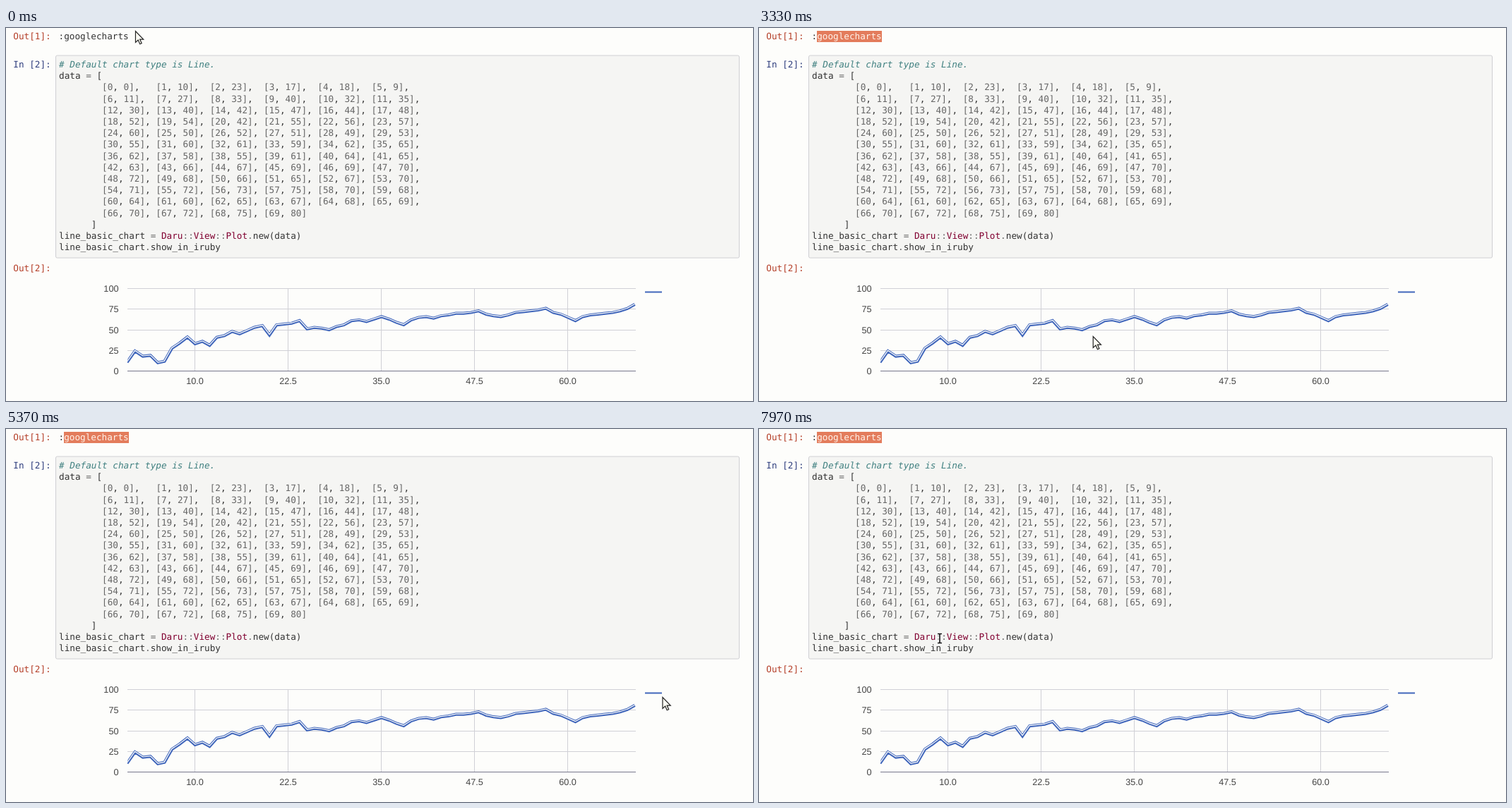
Write an HTML page that moves like this. It is 1058x529 px and loops after 8 s.

```html
<!DOCTYPE html>
<html lang="en">
<head>
<meta charset="utf-8">
<title>Line chart notebook</title>
<style>
  html, body { margin: 0; width: 100%; height: 100%; overflow: hidden; background: #fdfdfb; }
  svg { display: block; width: 1058px; height: 529px; }
  text { white-space: pre; text-rendering: geometricPrecision; fill: #333; }
  .code { font: 12.68px "DejaVu Sans Mono", monospace; }
  .label { font: 12.7px "Liberation Sans", Arial, sans-serif; fill: #444; }
  .tip { font: bold 12.7px "Liberation Sans", Arial, sans-serif; fill: #000; }
  .in { fill: #303f7f; }
  .out { fill: #b5402a; }
  .comment { fill: #408080; font-style: italic; }
  .op { fill: #666; }
  .const { fill: #800030; }
  .series { fill: none; stroke: #4066bb; stroke-width: 2; }
</style>
</head>
<body>
<svg id="stage" viewBox="0 0 1058 529"></svg>
<script>
const values = [
  0, 10, 23, 17, 18, 9, 11, 27, 33, 40, 32, 35, 30, 40, 42, 47, 44, 48,
  52, 54, 42, 55, 56, 57, 60, 50, 52, 51, 49, 53, 55, 60, 61, 59, 62, 65,
  62, 58, 55, 61, 64, 65, 63, 66, 67, 69, 69, 70, 72, 68, 66, 65, 67, 70,
  71, 72, 73, 75, 70, 68, 64, 60, 65, 67, 68, 69, 70, 72, 75, 80];
const px = v => 161.8 + v * 10.57;
const py = v => 486.5 - v * 1.17;

const span = (cls, s) => `<tspan class="${cls}">${s}</tspan>`;
const text = (cls, x, y, s, extra = '') => `<text class="${cls}" x="${x}" y="${y}" ${extra}>${s}</text>`;
const line = (x1, y1, x2, y2, color) =>
  `<path d="M${x1} ${y1}L${x2} ${y2}" stroke="${color}"/>`;

// Code cell
const pairs = values.map((v, i) => {
  const pair = `[${i}, ${v}]` + (i < 69 ? ',' : '');
  return pair.padEnd(10).replace(/[\[\]\d]+/g, m => span('op', m));
});
const code = [span('comment', '# Default chart type is Line.'), `data ${span('op', '=')} [`];
for (let i = 0; i < 70; i += 6) code.push(' '.repeat(8) + pairs.slice(i, i + 6).join(''));
const sep = span('op', '::'), dot = span('op', '.');
const path = ['Daru', 'View', 'Plot'].map(s => span('const', s)).join(sep);
code.push('      ]', `line_basic_chart ${span('op', '=')} ${path}${dot}new(data)`,
  `line_basic_chart${dot}show_in_iruby`);

let cell = '<rect x="70.5" y="39" width="968" height="287" rx="2" fill="#f5f5f3" stroke="#cfcfd3"/>';
code.forEach((s, i) => cell += text('code', 75, 56 + i * 16.2, s));

// Axes and grid
let grid = '';
for (const v of [10, 22.5, 35, 47.5, 60]) {
  const x = Math.round(px(v)) - .5;
  grid += line(x, 369, x, 486, '#d0d0d6') +
    text('label', x, 505, v.toFixed(1), 'text-anchor="middle"');
}
for (const v of [0, 25, 50, 75, 100]) {
  const y = Math.floor(py(v)) + .5;
  grid += line(172, y, 892, y, v ? '#d0d0d6' : '#77778c') +
    text('label', 159.5, y + 4.3, v, 'text-anchor="end"');
}

const points = values.slice(1).map((v, i) => `${px(i + 1).toFixed(2)} ${py(v).toFixed(2)}`).join('L');
const curve = 'M' + points;

document.getElementById('stage').innerHTML = `
  <clipPath id="above"><path d="${curve}V350H${px(1)}Z"/></clipPath>
  <filter id="soft"><feGaussianBlur stdDeviation="1"/></filter>
  <rect width="1058" height="529" fill="#fdfdfb"/>
  ${text('code out', 10.3, 16, 'Out[1]:')}
  ${text('code', 74.5, 16, ':')}
  <rect id="mark" x="82" y="4" width="92" height="16" fill="#e37c5c"/>
  ${text('code', 82.13, 16, 'googlecharts', 'id="word"')}
  ${text('code in', 10.3, 56, 'In [2]:')}
  ${cell}
  ${text('code out', 10.3, 344.5, 'Out[2]:')}
  ${grid}
  <g id="ring" clip-path="url(#above)" fill="none">
    <path d="${curve}" stroke="#4066bb" stroke-width="6.4"/>
    <path d="${curve}" stroke="#fdfdfb" stroke-width="4.4"/>
  </g>
  <path id="glow" d="${curve}" transform="translate(1 1.5)" filter="url(#soft)"
    fill="none" stroke="#4066bb" stroke-opacity=".4" stroke-width="3"/>
  <path class="series" d="${curve}"/>
  <path class="series" d="M905 374.5H929"/>
  <g id="tip">
    <circle r="4" fill="#4063b4"/>
    <rect x="-2" y="-58" width="40" height="44" fill="#999" opacity=".4" filter="url(#soft)"/>
    <path d="M-3.5 -59.5H36.5V-15.5H33L4 -3L16 -15.5H-3.5Z" fill="#fff" stroke="#d2d2d2"/>
    ${text('tip', 4, -41.5, '', 'id="tipX"')}
    ${text('tip', 4, -25.3, '', 'id="tipY"')}
  </g>
  <path id="arrow" d="M0 0V16L3.7 12.6L6.2 18.3L8.7 17.2L6.2 11.6H11.2Z" fill="#fffef4" stroke="#222" stroke-width="1.2"/>
  <g id="beam" fill="none">
    <path d="M-3 -6.5H3M0 -6.5V6.5M-3 6.5H3" stroke="#fff" stroke-width="3.4"/>
    <path d="M-3 -6.5H3M0 -6.5V6.5M-3 6.5H3" stroke="#111" stroke-width="1.6"/>
  </g>`;

// Pointer route: time, x, y
const route = [
  [0, 183.5, 4.5], [600, 158, 9], [1000, 150, 11], [1600, 234, 441], [2100, 268.5, 434.5],
  [2500, 310, 436], [3330, 473, 437.5], [4300, 701, 404.5], [5000, 930, 379], [5370, 930, 380.5],
  [6100, 921, 371], [6870, 920.5, 370.5], [7540, 920.5, 370.5], [7970, 256, 297], [8000, 256, 297]];
// Hovered points: from, to, index
const hovers = [[1850, 2220, 8], [4130, 4420, 49]];

const el = id => document.getElementById(id);
const show = (id, on) => el(id).style.display = on ? '' : 'none';
const move = (id, x, y) => el(id).setAttribute('transform', `translate(${x} ${y})`);

function draw(t) {
  const i = route.findIndex(k => k[0] > t);
  const [t0, x0, y0] = route[i - 1], [t1, x1, y1] = route[i];
  const p = (t - t0) / (t1 - t0);
  const x = x0 + (x1 - x0) * p, y = y0 + (y1 - y0) * p;
  const overText = y < 22 && x < 176 || x > 70 && x < 1038 && y > 39 && y < 326;
  show('arrow', !overText);
  show('beam', overText);
  move('arrow', x, y);
  move('beam', x, y);

  const marked = t >= 720;
  show('mark', marked);
  el('word').style.fill = marked ? '#fff4ec' : '#333';

  const selected = t < 6300 || t >= 7250;
  show('ring', selected);
  show('glow', !selected);

  const hover = hovers.find(h => t >= h[0] && t < h[1]);
  show('tip', hover);
  if (hover) {
    const n = hover[2];
    move('tip', px(n), py(values[n]));
    el('tipX').textContent = n;
    el('tipY').textContent = values[n];
  }
}

const start = performance.now();
function tick() {
  draw((performance.now() - start) % 8000);
  requestAnimationFrame(tick);
}
tick();
</script>
</body>
</html>
```
